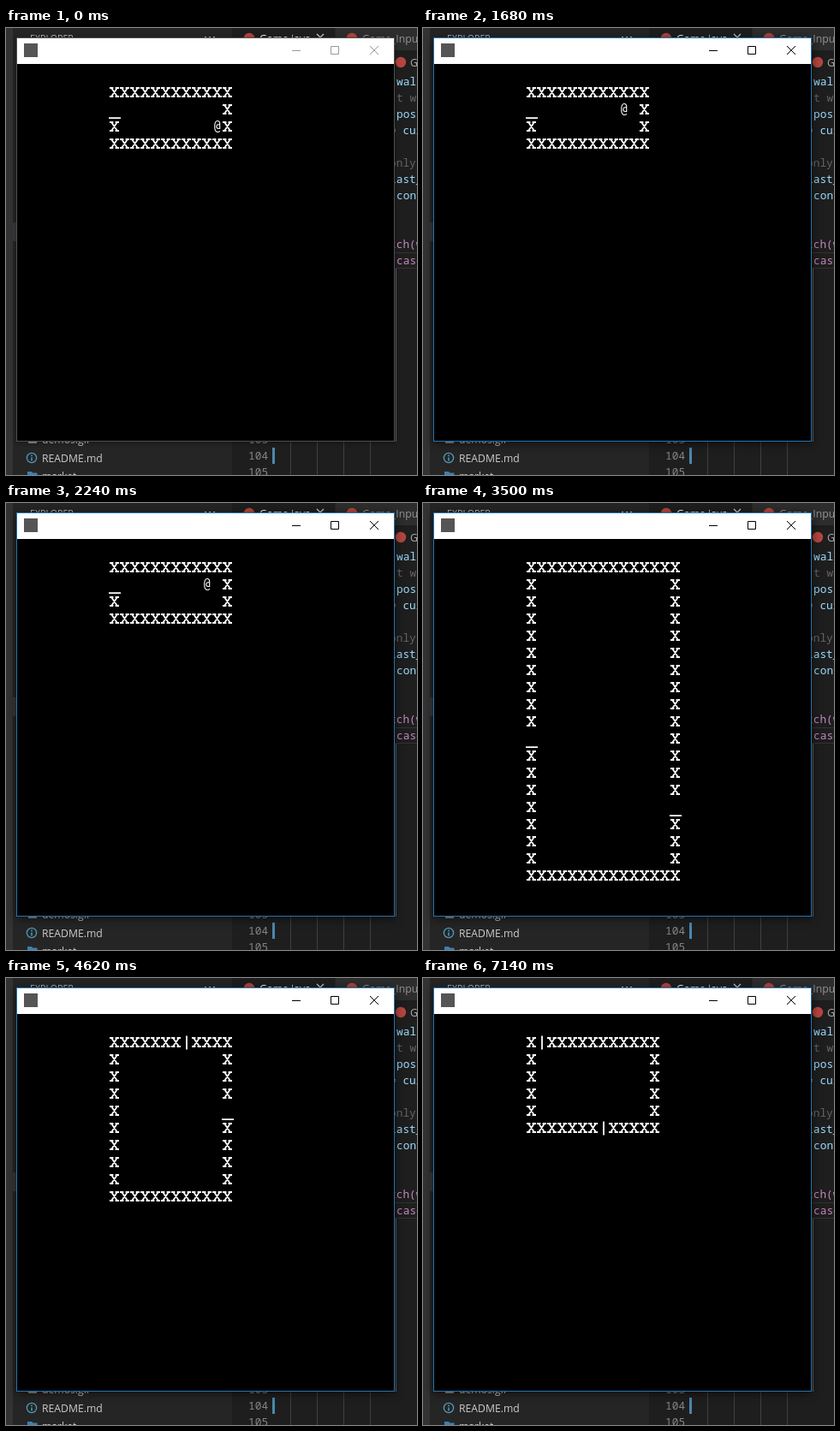
An HTML page for the animation above (8000 ms loop, 480 by 522 pixels).

```html
<!DOCTYPE html>
<html lang="en">
<head>
<meta charset="utf-8">
<title>Text dungeon rooms</title>
<style>
  html, body { margin: 0; height: 100%; overflow: hidden; background: #1e1e1e; }
  svg { display: block; width: 100%; height: 100%; }
  text { white-space: pre; }
  .ui { font: 12.2px "Open Sans", "Noto Sans", sans-serif; fill: #ccc; }
  .code { font: 12.83px "Noto Sans Mono", "DejaVu Sans Mono", monospace; }
  .variable { fill: #9cdcfe; }
  .comment { fill: #656565; }
  .keyword { fill: #c586c0; }
  .number { fill: #858585; }
  #frame { stroke: #505050; filter: drop-shadow(0 1px 3px #0006); }
  #controls { fill: none; stroke: #999; }
  .active #frame { stroke: #2673ad; filter: drop-shadow(0 2px 6px #0009); }
  .active #controls { stroke: #000; }
  #guide { fill: #666; }
  .active #guide { fill: #596874; }
</style>
</head>
<body>
<svg id="stage" viewBox="0 0 480 522">
  <!-- Editor behind the game window -->
  <rect width="480" height="522" fill="#1e1e1e"/>
  <rect width="264" height="522" fill="#252526"/>
  <rect width="8" height="522" fill="#333"/>
  <rect x="8" y="227" width="256" height="22" fill="#37373d"/>
  <rect x="264" width="216" height="26" fill="#252526"/>
  <rect x="264" width="120" height="26" fill="#1e1e1e"/>
  <rect x="385" width="95" height="26" fill="#2d2d2d"/>

  <g class="ui">
    <text x="28" y="16" font-size="10.6" fill="#bbb">EXPLORER</text>
    <path d="M232 10h2v2h-2zM237 10h2v2h-2zM242 10h2v2h-2z"/>
    <text x="296" y="17" style="fill:#fff">Game.java</text>
    <path d="M363 7l8 8m0-8l-8 8" stroke="#ccc" stroke-width="1.2"/>
    <text x="416" y="17" style="fill:#969696">Game_Input.java</text>
    <text x="472" y="45" style="fill:#a9a9a9">Game</text>
    <text x="42" y="485">demos.gif</text>
    <text x="42" y="507">README.md</text>
    <text x="42" y="528">market</text>
  </g>
  <g fill="#b5463f">
    <circle cx="284" cy="12" r="6.2"/>
    <circle cx="404" cy="12" r="6.2"/>
    <circle cx="461" cy="40" r="6.2"/>
  </g>
  <rect x="26" y="475" width="10" height="10" fill="#8a9499"/>
  <circle cx="30" cy="502" r="5.6" fill="none" stroke="#519aba" stroke-width="1.3"/>
  <path d="M30 498.6v1.6m0 1.2v4" stroke="#519aba" stroke-width="1.5"/>
  <path d="M25 522v-4h5l1.5 1.5h5v2.500z" fill="#3f7fae"/>

  <path d="M440 262.500h40M440 280.500h40" stroke="#333"/>
  <g id="code" class="code"></g>
  <path d="M332.500 478v44M363.500 478v44M394.500 478v44M425.500 478v44" stroke="#404040"/>
  <rect id="guide" x="455" y="281" width="1" height="202"/>
  <rect x="311" y="490" width="3" height="19" fill="#4b87ac"/>

  <!-- Game window -->
  <rect id="frame" x="12.500" y="11.500" width="441" height="471"/>
  <rect x="13" y="12" width="440" height="30" fill="#fff"/>
  <rect x="21" y="18" width="16" height="16" fill="#555"/>
  <path id="controls" d="M334 26.500h10M379.500 21.500h9v9h-9zM425 21l10 10m0-10l-10 10"/>
  <path id="walls" fill="none" stroke="#fff" stroke-width="1.8"/>
  <path id="player" fill="none" stroke="#fff" stroke-width="1.1"
    d="M9 13.300Q7.800 14.500 6 14.500Q2.700 14.500 2.700 8Q2.700 1.500 6 1.500Q8.700 1.500 8.700 5V10.500H7.300Q4.800 10.500 4.800 8Q4.800 5.500 8.700 5.500"/>
</svg>
<script>
const LOOP = 8000, CELL_W = 12, CELL_H = 20, LEFT = 120.5, TOP = 65;
const byId = id => document.getElementById(id);

// Glyph outlines inside one 12 x 20 cell
const GLYPHS = {
  X: [[0.5, 5, 'h4.4'], [7.1, 5, 'h4.4'], [0.5, 15, 'h4.4'], [7.1, 15, 'h4.4'],
      [2.6, 5, 'l6.800 10'], [9.4, 5, 'l-6.800 10']],
  _: [[-0.5, 20.2, 'h14']],
  '|': [[6.5, 2.5, 'v16']],
};

// doors are [column, row]
const ROOMS = [
  { at: 0, cols: 12, rows: 4, doors: [[0, 1]] },
  { at: 3500, cols: 15, rows: 19, doors: [[0, 10], [14, 14]] },
  { at: 4620, cols: 12, rows: 10, doors: [[7, 0], [11, 4]] },
  { at: 5880, cols: 9, rows: 8, doors: [[4, 0], [1, 7]] },
  { at: 7140, cols: 13, rows: 6, doors: [[1, 0], [7, 5]] },
];

const STEPS = [
  { at: 0, col: 10, row: 2 },
  { at: 1120, col: 10, row: 1 },
  { at: 1680, col: 9, row: 1 },
  { at: 3500, hidden: true },
];

const CODE = [
  [456, 67, 'variable', 'wall'], [456, 86, 'comment', 't wa'],
  [456, 105, 'variable', 'posi'], [448, 124, 'variable', '= cur'],
  [448, 162, 'comment', 'only'], [448, 181, 'variable', 'last_'],
  [456, 200, 'variable', 'cont'], [448, 257, 'keyword', 'tch('],
  [479, 257, 'variable', 'w'], [456, 276, 'keyword', 'case'],
  [283, 485, 'number', '103'], [283, 504, 'number', '104'], [283, 523, 'number', '105'],
];
byId('code').innerHTML = CODE.map(([x, y, kind, text]) =>
  `<text x="${x}" y="${y}" class="${kind}">${text}</text>`).join('');

function glyph(name, col, row) {
  return GLYPHS[name].map(([x, y, line]) =>
    `M${LEFT + col * CELL_W + x} ${TOP + row * CELL_H + y}${line}`).join('');
}

function roomPath({ cols, rows, doors }) {
  let path = '';
  for (let row = 0; row < rows; row++) {
    for (let col = 0; col < cols; col++) {
      const horizontal = row === 0 || row === rows - 1;
      if (!horizontal && col !== 0 && col !== cols - 1) continue;
      const isDoor = doors.some(([c, r]) => c === col && r === row);
      path += glyph(!isDoor ? 'X' : horizontal ? '|' : '_', col, row);
    }
  }
  return path;
}

ROOMS.forEach(room => room.path = roomPath(room));
const current = (list, time) => list.findLast(item => item.at <= time);
let shownRoom;

function draw(now) {
  const time = now % LOOP;
  const room = current(ROOMS, time);
  const step = current(STEPS, time);
  byId('stage').classList.toggle('active', time >= 280);
  if (room !== shownRoom) byId('walls').setAttribute('d', room.path);
  shownRoom = room;
  byId('player').style.display = step.hidden ? 'none' : '';
  if (!step.hidden) {
    byId('player').setAttribute('transform',
      `translate(${LEFT + step.col * CELL_W + 0.5} ${TOP + step.row * CELL_H + 2})`);
  }
}

const start = performance.now();
function tick() {
  draw(performance.now() - start);
  requestAnimationFrame(tick);
}
tick();
</script>
</body>
</html>
```
